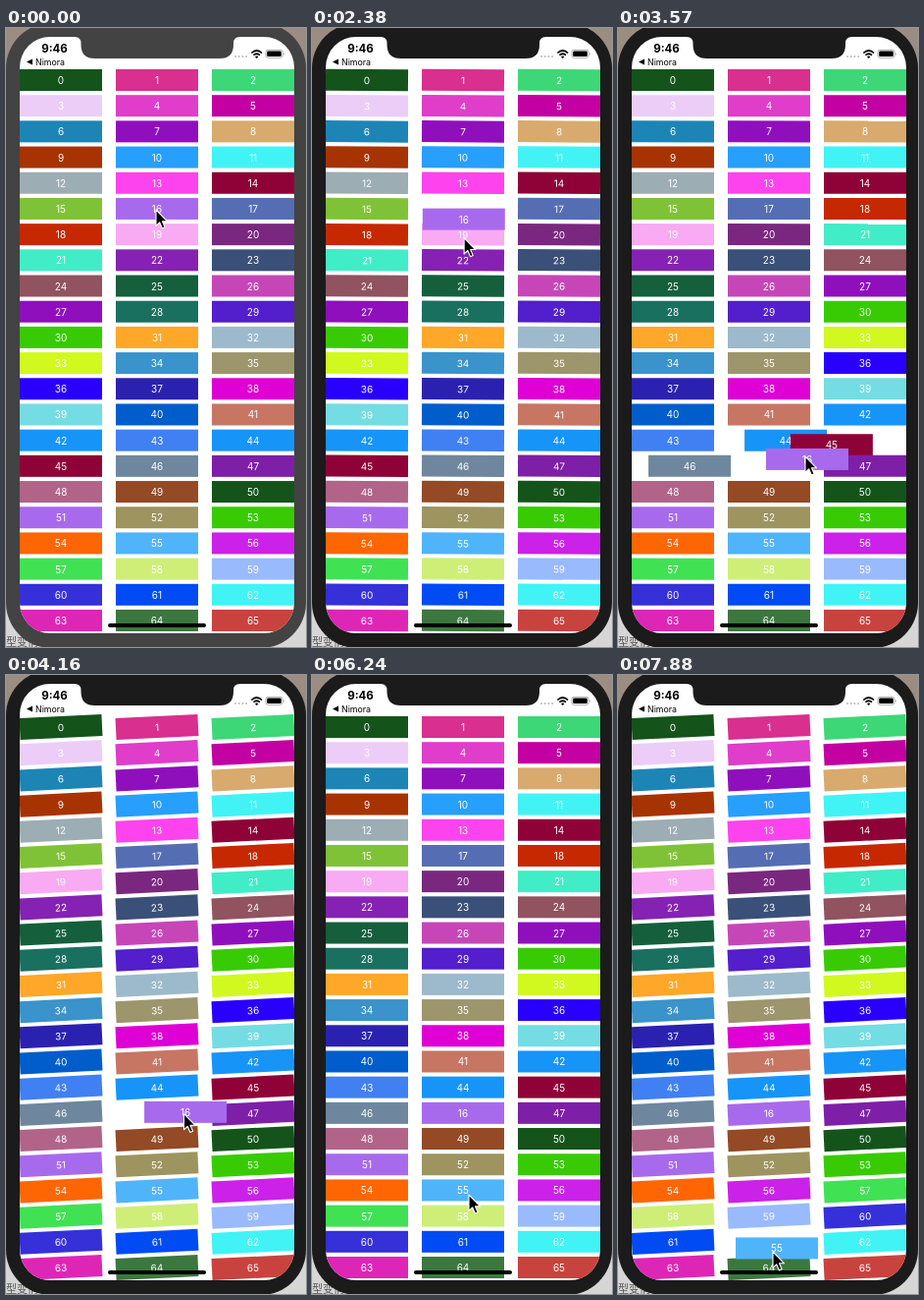
An HTML page for the animation above (8 s loop, 306 px wide and 630 px high).

```html
<!DOCTYPE html>
<html lang="en">
<head>
<meta charset="utf-8">
<title>Reorderable grid</title>
<style>
  html, body { margin: 0; width: 100%; height: 100%; overflow: hidden; }
  body {
    position: relative;
    background: linear-gradient(#9c8d82 0 300px, #d6d6d6 300px);
    font-family: Inter, "Liberation Sans", sans-serif;
  }
  #stage, #screen, svg { position: absolute; left: 0; top: 0; width: 306px; height: 630px; }
  #stage { overflow: hidden; --bezel: #1b1b1b; }
  #stage.pressed { --bezel: #434343; }
  #note {
    position: absolute; left: 0; top: 617px; color: #555;
    font: 11px/15px "Noto Sans CJK SC", "Noto Sans CJK", sans-serif; white-space: nowrap;
  }
  #case {
    position: absolute; left: 0; top: -5px; width: 306px; height: 636px;
    border-radius: 46px; background: var(--bezel);
  }
  #screen { background: #fff; clip-path: inset(9px 12px 14px 14px round 31px); }
  .cell {
    position: absolute; left: 0; top: 0; width: 84px; height: 22.4px;
    color: #fff; font-size: 10px; line-height: 22.4px; text-align: center;
  }
  .notch { fill: var(--bezel); }
</style>
</head>
<body>
<div id="stage">
  <div id="note">型变情</div>
  <div id="case"></div>
  <div id="screen"></div>
  <svg viewBox="0 0 306 630">
    <path class="notch" d="M70 8.5V9Q76.500 9 76.500 15.500V17Q76.500 31 90.500 31H218Q232 31 232 17V15.500Q232 9 238.500 9V8.500Z"/>
    <text x="49.500" y="24.500" font-size="11.500" font-weight="700" text-anchor="middle">9:46</text>
    <path d="M21 34.500L27 31.500V37.500Z"/>
    <text x="30" y="37.600" font-size="8.800">Nimora</text>
    <g fill="#bbb">
      <circle cx="234" cy="29" r="1"/><circle cx="237.700" cy="29" r="1"/>
      <circle cx="241.400" cy="29" r="1"/><circle cx="245.100" cy="29" r="1"/>
    </g>
    <g fill="none" stroke="#000" stroke-width="1.700">
      <path d="M250.300 25.500Q255.700 20.500 261.100 25.500"/>
      <path d="M252.400 27.700Q255.700 24.800 259 27.700"/>
    </g>
    <path d="M254 29.200Q255.700 27.900 257.400 29.200L255.700 31Z"/>
    <rect x="264.900" y="22.300" width="17.200" height="8" rx="2.300" fill="none" stroke="#999" stroke-width=".8"/>
    <rect x="266.200" y="23.600" width="14.600" height="5.400" rx="1.200"/>
    <path d="M283 24.900Q284.800 26.300 283 27.700Z" fill="#999"/>
    <rect x="104" y="606" width="100" height="4" rx="2"/>
    <path id="cursor" d="M0 0V16.300L3.700 12.800L6.400 19L9.100 17.800L6.500 11.800H11.600Z"
      stroke="#fff" stroke-width="1.100" stroke-linejoin="round"/>
  </svg>
</div>
<script>
const LOOP = 8000, LAG = 100, SETTLE = 250;
const colors = `14541b d92f8e 3dd778 eccdf7 df3dca c300a2 1d85b5 900fbd d8aa6e a83302 279ffc
  42f3f5 9cadb4 fd43ee 8f0237 80c237 a86aec 556eb3 c62901 f8aaf3 7a2780 40edc7 8522b3 3b5078
  90535f 155f3c c646b8 900fbd 1a705f 531ecc 38cb04 fea728 9cbacb d1f91f 3a93ca 9d966c 2900fc
  2b21b0 de00d4 74dce3 005dcb c77664 1794f8 4080f2 1794f8 8f0237 6e879e 7e1fa8 b16488 934a25
  14541b a86aec 9d9460 38cb04 fe6603 50b4fa cb21e8 41e154 cfee78 99bafc 3630d9 004bf3 42f3f5
  de26b6 3c773f c8433e`.split(/\s+/);

// Pointer path: time, x, y
const path = [
  [0, 153, 185], [2080, 153, 185], [2600, 160, 279], [2875, 166, 286], [2975, 165, 309],
  [3280, 186, 435], [3463, 192, 440], [3563, 191, 436], [3900, 183, 445], [4400, 180, 448],
  [4888, 176, 490], [5450, 160, 529], [7250, 160, 529], [7500, 165, 577], [7780, 168, 588],
  [7880, 158, 587], [LOOP, 158, 587]
];
const drags = [
  { n: 16, from: 1650, to: 4310, peak: 1650, swing: 0.05 },
  { n: 55, from: 7130, to: LOOP, peak: 7880, swing: -0.05 }
];

const slot = i => [14 + 98 * (i % 3), 42 + 26.19 * Math.floor(i / 3)];
const mix = (a, b, k) => a.map((v, i) => v + (b[i] - v) * k);
const ease = k => { k = Math.min(1, Math.max(0, k)); return k * k * (3 - 2 * k); };

function pointer(t) {
  const i = Math.max(1, path.findIndex(p => p[0] >= t));
  const [a, b] = [path[i - 1], path[i]];
  return mix(a, b, (t - a[0]) / (b[0] - a[0])).slice(1);
}

function held(d, t) {
  const home = slot(d.n), start = pointer(d.from), now = pointer(t - LAG);
  return home.map((v, i) => v + now[i] - start[i]);
}

// Every time the touch enters another slot, the list is reordered.
function findMoves() {
  const moves = [];
  let order = colors.map((_, i) => i);
  for (const d of drags) {
    for (let t = d.from; t < d.to; t += 5) {
      const [x, y] = pointer(t - LAG);
      const at = order.findIndex((_, i) => {
        const [l, top] = slot(i);
        return x >= l && x < l + 84 && y >= top && y < top + 22.4;
      });
      if (at < 0 || order[at] === d.n) continue;
      order = order.filter(n => n !== d.n);
      order.splice(at, 0, d.n);
      moves.push({ t, order });
    }
  }
  return moves;
}
const moves = findMoves();

function place(n, t) {
  let p = slot(n);
  for (const m of moves)
    if (m.t <= t) p = mix(p, slot(m.order.indexOf(n)), ease((t - m.t) / SETTLE));
  const d = drags.find(d => d.n === n);
  if (!d || t < d.from) return p;
  return t < d.to ? held(d, t) : mix(held(d, d.to), p, ease((t - d.to) / SETTLE));
}

// The picture advances in steps of about 1/7 s, with pauses.
function snap(t) {
  if (t < 600) return 0;
  if (t < 1650) return 600;
  if (t < 6240) return 1650 + 147.2 * Math.min(27, Math.floor((t - 1650) / 147.2));
  if (t < 7130) return 6240;
  return 7130 + 150 * Math.floor((t - 7130) / 150);
}

const stage = document.getElementById("stage");
const cursor = document.getElementById("cursor");
const cells = colors.map((c, i) => {
  const el = document.createElement("div");
  el.className = "cell";
  el.textContent = i;
  el.style.background = "#" + c;
  document.getElementById("screen").append(el);
  return el;
});

function draw(t) {
  const active = drags.find(d => t >= d.from && t < d.to);
  const tilt = active ? active.swing * Math.cos(2 * Math.PI * (t - active.peak) / 264) : 0;
  cells.forEach((el, n) => {
    const [x, y] = place(n, t), lifted = active && active.n === n;
    el.style.transform = `translate(${x}px, ${y}px) rotate(${lifted ? 0 : tilt}rad)`;
    el.style.zIndex = drags.some(d => d.n === n && t >= d.from) ? 1 : 0;
  });
  cursor.setAttribute("transform", `translate(${pointer(t)})`);
  stage.classList.toggle("pressed", t < 600 || (t > 5600 && t < 6240));
}

const begin = performance.now();
let last = -1;
function tick() {
  const t = snap((performance.now() - begin) % LOOP);
  if (t !== last) draw(last = t);
  requestAnimationFrame(tick);
}
tick();
</script>
</body>
</html>
```
